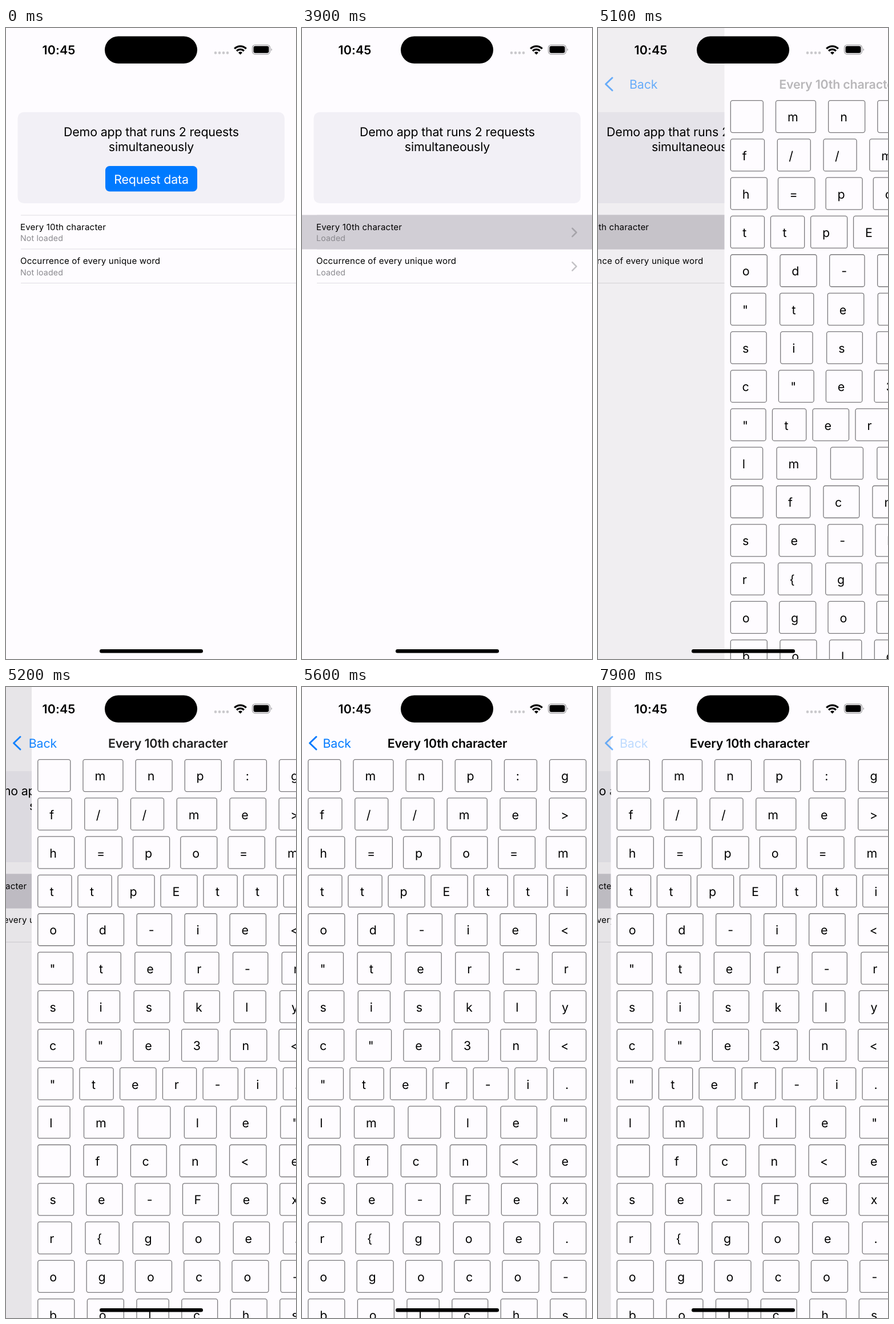
Write an HTML page that moves like this. It is 508 by 1102 pixels and loops after 8 s.

```html
<!DOCTYPE html>
<html lang="en">
<head>
<meta charset="utf-8">
<title>Two requests demo</title>
<style>
  html, body { margin: 0; width: 100%; height: 100%; overflow: hidden; background: #fefcff; }
  svg { display: block; width: 100%; height: 100%; }
  text {
    font: 21.4px Inter, Roboto, sans-serif;
    font-optical-sizing: none;
    letter-spacing: -.17px;
    text-rendering: geometricPrecision;
  }
  .center { text-anchor: middle; }
  .row { font-size: 15.1px; letter-spacing: .17px; }
  .detail { font-size: 14.2px; letter-spacing: .15px; fill: #8a898e; }
  .bold { font-weight: 600; letter-spacing: -.2px; }
  .clock { font-weight: 600; letter-spacing: .15px; }
  .line { fill: none; stroke-linecap: round; stroke-linejoin: round; }
  .tile { fill: none; stroke: #79787b; stroke-width: 1.3; }
</style>
</head>
<body>
<svg viewBox="0 0 508 1102">
  <g id="home">
    <rect width="508" height="1102" fill="#fefcff"/>
    <rect x="20.5" y="147" width="467.5" height="159" rx="10.5" fill="#f2f0f6"/>
    <text class="center" x="254.5" y="189">Demo app that runs 2 requests</text>
    <text class="center" x="254.5" y="215">simultaneously</text>
    <g id="button">
      <rect x="174" y="241" width="161" height="44.5" rx="7.5" fill="#007aff"/>
      <text class="center" x="254.5" y="271.5" fill="#fff">Request data</text>
    </g>
    <path d="M26 327H508M26 386H508M26 445.5H508" stroke="#dfdde1" stroke-width="1.1"/>
    <rect id="highlight" y="326.5" width="508" height="60" fill="#d1ced5"/>
    <text class="row" x="25" y="352.5">Every 10th character</text>
    <text class="detail" x="25" y="372.3"></text>
    <text class="row" x="25" y="412">Occurrence of every unique word</text>
    <text class="detail" x="25" y="431.8"></text>
    <g id="arrows" class="line" stroke="#c3c2c6" stroke-width="2.5">
      <path id="firstArrow" d="M473.5 349.8L480.7 357L473.5 364.2"/>
      <path d="M473.5 409.2L480.7 416.4L473.5 423.6"/>
    </g>
    <rect id="dim" width="700" height="1102"/>
  </g>

  <g id="page">
    <rect width="508" height="1102" fill="#fefcff"/>
    <g id="tiles"></g>
  </g>

  <g id="nav">
    <path id="backArrow" class="line" d="M25 87L13.5 98L25 109" stroke="#007aff" stroke-width="3"/>
    <text id="backLabel" x="36.5" y="105.5" fill="#007aff">Back</text>
    <text id="title" class="bold center" x="254.5" y="105.5">Every 10th character</text>
  </g>

  <g id="status">
    <text class="clock center" x="92.5" y="45.7">10:45</text>
    <rect x="173" y="14.5" width="162" height="47.5" rx="23.75"/>
    <path class="line" d="M367 43.4h.01m7 0h.01m7 0h.01m7 0h.01" stroke="#cac9cc" stroke-width="4.6"/>
    <path d="M400.2 36.2A14.5 14.5 0 0 1 420.8 36.2M404.1 40.1A9 9 0 0 1 416.9 40.1"
          fill="none" stroke="#000" stroke-width="3.2"/>
    <path d="M410.5 46.5L407 43A5 5 0 0 1 414 43Z"/>
    <rect x="431.5" y="29.5" width="31" height="16.3" rx="5" fill="none" stroke="#9b9a9d" stroke-width="1.2"/>
    <rect x="433.5" y="31.6" width="27" height="12.2" rx="3.2"/>
    <path d="M464.5 35.2Q467.5 37.7 464.5 40.2Z" fill="#9b9a9d"/>
    <rect x="164" y="1085" width="181" height="6.6" rx="3.3"/>
  </g>
</svg>
<script>
const LOOP = 8000, STEP = 100, WIDTH = 508;
const $ = id => document.getElementById(id);
const clamp = v => Math.min(1, Math.max(0, v));
const shift = (el, x) => el.setAttribute('transform', `translate(${x.toFixed(2)} 0)`);
const show = (el, visible) => { el.style.display = visible ? '' : 'none'; };
const details = document.querySelectorAll('.detail');

function add(parent, tag, attrs, text = '') {
  const el = document.createElementNS('http://www.w3.org/2000/svg', tag);
  for (const name in attrs) el.setAttribute(name, attrs[name]);
  el.textContent = text;
  parent.append(el);
}

// Tiles are as wide as their character needs; each row is justified.
const tileWidths = [['m', 70], ['tfr{', 59.2], ['/', 58], [':. ', 57], ['il', 56.3], ['-', 61.3],
  ['"', 61.7], ['sckyxF', 62.8], ['e', 63.4], ['<>=', 64.4]];
const tileWidth = c => (tileWidths.find(([set]) => set.includes(c)) || ['', 64])[1];
const rows = [' mnp:g', 'f//me>', 'h=po=m', 'ttpEtti', 'od-ie<', '"ter-r', 'siskly', 'c"e3n<',
  '"ter-i.', 'lm le"', ' fcn<e', 'se-Fex', 'r{goe.', 'ogoco-', 'bolchs'];

rows.forEach((row, i) => {
  const chars = [...row], left = 10.8, right = 497.6, y = 126.6 + 67.29 * i;
  const used = chars.reduce((sum, c) => sum + tileWidth(c), 0);
  const gap = (right - left - used) / (chars.length - 1);
  let x = left;
  for (const c of chars) {
    const width = tileWidth(c);
    add($('tiles'), 'rect', { class: 'tile', x, y, width, height: 56, rx: 3.5 });
    if (c !== ' ') add($('tiles'), 'text', { class: 'center', x: x + width / 2 - 5.2, y: y + 36.7 }, c);
    x += width + gap;
  }
});

// Critically damped spring, from 1 to 0.
function spring(seconds) {
  const x = 21.5 * seconds;
  return (1 + x) * Math.exp(-x);
}

function pageOffset(t) {
  if (t < 5000) return WIDTH;
  if (t < 5600) return WIDTH * spring(Math.max(.012, (t - 5012) / 1000));
  if (t < 7800) return 0;
  return t < 7900 ? 9 : 22.5;
}

function draw(t) {
  const loaded = t >= 600, selected = t >= 3900, pushed = t >= 5000, swiping = t >= 7800;
  $('button').style.opacity = t < 500 ? 1 : t < 600 ? .6 : t < 700 ? .2 : 0;
  for (const el of details) el.textContent = loaded ? 'Loaded' : 'Not loaded';
  show($('arrows'), loaded);
  show($('highlight'), selected);
  $('firstArrow').setAttribute('stroke', selected ? '#a5a3a9' : '#c3c2c6');

  const offset = pageOffset(t), progress = 1 - offset / WIDTH;
  shift($('home'), -.3 * WIDTH * progress);
  $('dim').style.opacity = .1 * progress;
  show($('page'), pushed);
  show($('nav'), pushed);
  shift($('page'), offset);

  // The bar settles slightly ahead of the page on a push.
  const lead = Math.max(0, offset - 7.5);
  shift($('title'), swiping ? offset / 2 : lead * .783);
  shift($('backLabel'), swiping ? offset / 15 : lead * .0865);
  $('title').style.opacity = swiping ? 1 : clamp(1 - lead * .0034);
  $('backLabel').style.opacity = clamp(1 - (swiping ? offset / 30 : lead * .002));
  $('backArrow').style.opacity = clamp(1 - (swiping ? offset / 50 : lead * .002));
}

const start = performance.now();
function tick() {
  const t = (performance.now() - start) % LOOP;
  draw(Math.floor(t / STEP) * STEP);
  requestAnimationFrame(tick);
}
tick();
</script>
</body>
</html>
```
